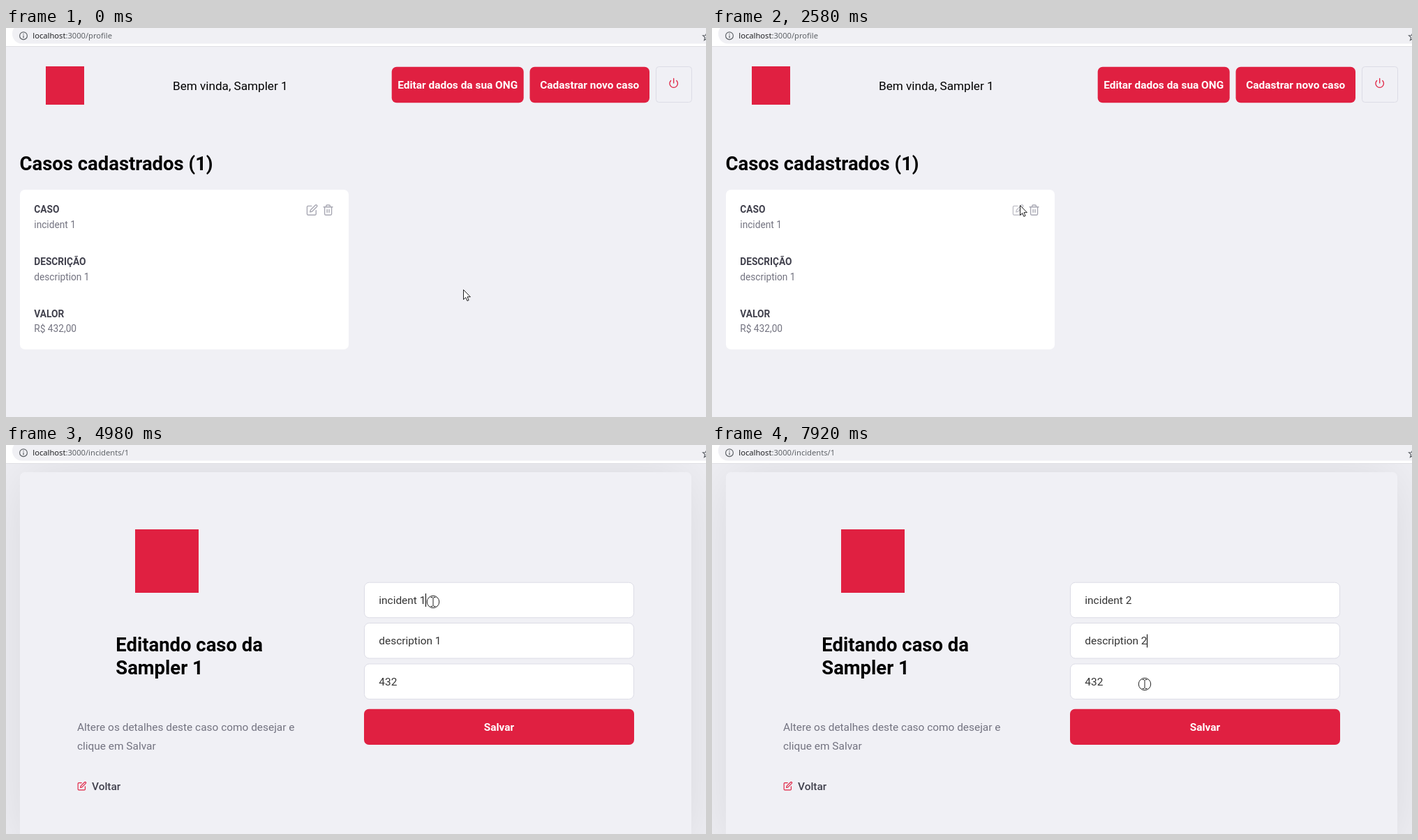
An HTML page that plays this animation: 1003x558 px, repeating every 8 s.

```html
<!DOCTYPE html>
<html lang="pt-BR">
<head>
<meta charset="utf-8">
<title>Casos</title>
<style>
  html, body { margin: 0; width: 100%; height: 100%; overflow: hidden; background: #f0f0f5; }
  svg { display: block; }
  text { font-family: Roboto, sans-serif; white-space: pre; }
  .url { font: 11.16px "Noto Sans", sans-serif; fill: #5f6368; }
  .hi { font-size: 17.14px; }
  .title { font-size: 27.43px; font-weight: 700; }
  .label { font-size: 13.71px; font-weight: 700; fill: #41414d; }
  .value { font-size: 13.71px; fill: #737380; }
  .button { font-size: 15.43px; font-weight: 700; fill: #fff; text-anchor: middle; }
  .input { font-size: 15.43px; fill: #333; }
  .note { font-size: 15.43px; fill: #737380; }
  .link { font-size: 15.43px; font-weight: 500; fill: #41414d; }
  .icon { fill: none; stroke-width: 2; stroke-linecap: round; stroke-linejoin: round; }
</style>
</head>
<body>
<svg id="stage" width="1003" height="558" viewBox="0 0 1003 558"></svg>
<script>
const RED = '#e02041', GRAY = '#a8a8b3', LINE = '#dcdce6';
const ICONS = {
  edit: 'M11 4H4a2 2 0 0 0-2 2v14a2 2 0 0 0 2 2h14a2 2 0 0 0 2-2v-7M18.5 2.5a2.12 2.12 0 0 1 3 3L12 15l-4 1 1-4z',
  trash: 'M3 6h18M19 6v14a2 2 0 0 1-2 2H7a2 2 0 0 1-2-2V6m3 0V4a2 2 0 0 1 2-2h4a2 2 0 0 1 2 2v2M10 11v6M14 11v6',
  power: 'M18.36 6.64a9 9 0 1 1-12.73 0M12 2v10'
};

const text = (cls, x, y, str, id = '') => `<text class="${cls}" x="${x}" y="${y}" id="${id}">${str}</text>`;
const box = (x, y, w, h, fill, more = '') =>
  `<rect x="${x}" y="${y}" width="${w}" height="${h}" rx="7" fill="${fill}" ${more}/>`;
const icon = (name, x, y, size, color, id = '') =>
  `<path class="icon" id="${id}" d="${ICONS[name]}" stroke="${color}" transform="translate(${x} ${y}) scale(${size / 24})"/>`;
const button = (x, y, w, label) =>
  box(x, y, w, 51.4, RED) + text('button', x + w / 2, y + 31, label);
const logo = (x, y, size) => `<rect x="${x}" y="${y}" width="${size}" height="${size}" fill="${RED}"/>`;
const field = (y, value, id) =>
  box(513.5, y + .5, 386, 50.5, '#fff', `stroke="${LINE}"`) + text('input', 534.3, y + 31, value, id);
const entry = (y, label, value) => text('label', 40.3, y, label) + text('value', 40.3, y + 21.5, value);

const profile = logo(57, 55, 55)
  + text('hi', 239, 88.5, 'Bem vinda, Sampler 1')
  + button(552.7, 55.8, 189, 'Editar dados da sua ONG')
  + button(750.5, 55.8, 171.5, 'Cadastrar novo caso')
  + `<rect x="931.5" y="55.5" width="51" height="51" rx="4" fill="none" stroke="${LINE}"/>`
  + icon('power', 949, 71.2, 15.4, RED)
  + text('title', 19.5, 204, 'Casos cadastrados (1)')
  + box(20, 232, 471, 229, '#fff')
  + entry(265.3, 'CASO', 'incident 1')
  + entry(340, 'DESCRIÇÃO', 'description 1')
  + entry(414.7, 'VALOR', 'R$ 432,00')
  + icon('edit', 430, 252.5, 17.1, GRAY, 'editIcon')
  + icon('trash', 453, 252.5, 17.1, GRAY);

const editor = box(20, 39, 962, 541, '#f0f0f5', 'style="filter:drop-shadow(0 0 43px rgba(0,0,0,.1))"')
  + logo(185, 121, 91)
  + text('title', 157.3, 296, 'Editando caso da') + text('title', 157.3, 328.7, 'Sampler 1')
  + text('note', 102, 409.7, 'Altere os detalhes deste caso como desejar e')
  + text('note', 102, 437, 'clique em Salvar')
  + icon('edit', 102, 482.3, 13.7, RED) + text('link', 123, 494.5, 'Voltar')
  + field(196.7, '', 'name') + field(255, '', 'about') + field(313.5, '432', 'value')
  + button(513, 378.7, 387, 'Salvar')
  + '<path id="caret" d="M.5 0v19" stroke="#000"/>';

const browserBar = '<path d="M0 0h1003v27H0z" fill="#fff"/><path d="M0 26.5h1003" stroke="#dfdfe3"/>'
  + '<rect x="9" y="-6" width="1020" height="28.5" rx="14" fill="#f0f0f4"/>'
  + '<g fill="none" stroke="#5f6368" stroke-width="1.2"><circle cx="25" cy="11.2" r="5.4"/>'
  + '<path d="M25 10.5v4M25 8v1.3M1004 6.5l-1.5 4-4 .3 3.1 2.7-1.1 4 3.5-2.2"/></g>'
  + '<text class="url" x="38.3" y="15.4"><tspan fill="#202124">localhost</tspan>:3000<tspan id="path"></tspan></text>';

const pointer = '<g id="pointer"><path id="arrow" d="M.5.5v14l3.2-3 2.2 4.9 2.2-1-2.1-4.7h4.4z" fill="#fff" stroke="#222"/>'
  + '<g id="beam" fill="none" stroke="#222"><path d="M-3.5-6.5h2.5l1 1 1-1h2.5M-3.5 6.5h2.5l1-1 1 1h2.5M0-5.5v11"/></g>'
  + '<circle id="ring" r="8.7" fill="none" stroke="#222"/></g>';

const $ = id => document.getElementById(id);
$('stage').innerHTML = `<g id="profile">${profile}</g><g id="editor">${editor}</g>${browserBar}${pointer}`;

// Pointer moves: start, end, number of steps, then [step, x, y] waypoints
const START = [655, 375];
const MOVES = [
  [80, 80, 1, [1, 651, 372]],
  [700, 860, 3, [3, 666, 365]],
  [1040, 1190, 3, [3, 660, 360]],
  [1530, 2300, 11, [3, 555, 278], [4, 510, 247], [6, 426, 345], [8, 344, 330], [11, 429, 302]],
  [2400, 2670, 4, [3, 441, 254], [4, 437, 259.5]],
  [4250, 4710, 7, [3, 505, 229], [6, 609, 221], [7, 612, 225]],
  [5590, 6090, 7, [4, 648, 258], [7, 629.5, 282]],
  [6980, 7740, 10, [5, 679, 312], [10, 620, 343]]
];
const CLICKS = [[3380, 3450], [4980, 5070], [6170, 6350], [7830, 8000]];

function pointerAt(t) {
  let [x, y] = START;
  for (const [from, to, count, ...points] of MOVES) {
    if (t < from) break;
    const step = t >= to ? count : 1 + Math.floor((t - from) / (to - from) * (count - 1));
    let last = 0;
    for (const [k, px, py] of points) {
      const u = Math.min(1, (step - last) / (k - last));
      x += (px - x) * u;
      y += (py - y) * u;
      if (step <= k) break;
      last = k;
    }
  }
  return [x, y];
}

const show = (id, on) => $(id).style.display = on ? '' : 'none';
const within = (t, a, b) => t >= a && t < b;
const typed = (t, word, erase, type) => word + (t < erase ? '1' : t < type ? '' : '2');

function draw() {
  const t = performance.now() % 8000;
  const editing = t >= 3540;
  show('profile', !editing);
  show('editor', editing);
  $('path').textContent = editing ? '/incidents/1' : '/profile';
  $('editIcon').style.opacity = t >= 2580 ? .7 : 1;

  $('name').textContent = typed(t, 'incident ', 5250, 5410);
  $('about').textContent = typed(t, 'description ', 6420, 6980);
  const second = t >= 6170;
  const caretX = Math.round(534.3 + $(second ? 'about' : 'name').getComputedTextLength());
  $('caret').setAttribute('transform', `translate(${caretX} ${second ? 271.5 : 213})`);
  show('caret', second || within(t, 4980, 5910));

  const [x, y] = pointerAt(t);
  const overField = editing && x > 513 && [197, 255, 314].some(top => within(y, top, top + 51));
  $('pointer').setAttribute('transform', `translate(${x} ${y})`);
  show('arrow', !overField);
  show('beam', overField);
  show('ring', CLICKS.some(([a, b]) => within(t, a, b)));
  requestAnimationFrame(draw);
}
draw();
</script>
</body>
</html>
```
